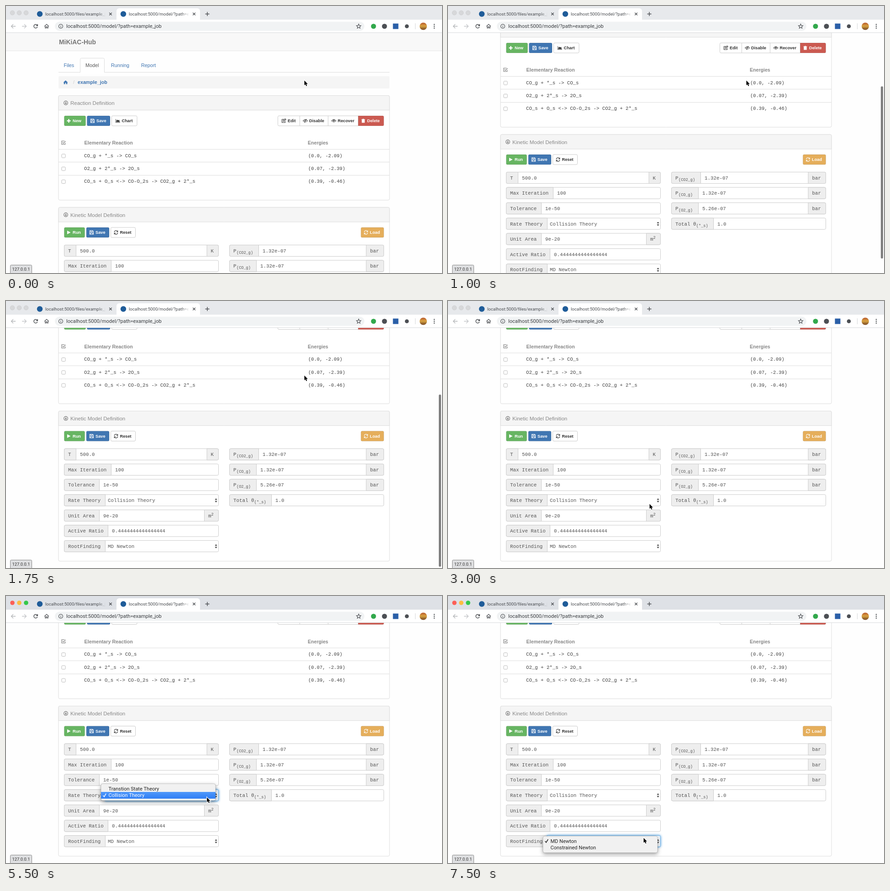
Recreate the animation shown at these times as an HTML page with a canvas. Size 955 by 586 pixels, loop 8000 ms.

```html
<!DOCTYPE html>
<html lang="en">
<head>
<meta charset="utf-8">
<title>Kinetic model form</title>
<style>
html, body { margin: 0; width: 100%; height: 100%; overflow: hidden; background: #fff; }
canvas { display: block; }
</style>
</head>
<body>
<canvas id="stage" width="955" height="586"></canvas>
<script>
const c = document.getElementById('stage').getContext('2d');
const W = 955, H = 586, LOOP = 8000, MAX_SCROLL = 200.5;
const SANS = '"Liberation Sans", Arial, sans-serif';
const MONO = '"Liberation Mono", monospace';
const UI = 'Roboto, sans-serif';
const GREEN = '#67b562', BLUE = '#4076b2', RED = '#cb5a51', ORANGE = '#e5ae5b';

// Step tracks: [start time, values...]
const SCROLL = [[0, 0], [750, 70.3], [1000, 160], [1250, 204.3], [1500, 203.4], [1750, MAX_SCROLL]];
const POINTER = [[0, 653, 163], [2500, 490, 257], [2750, 476, 290], [3000, 441, 445], [3250, 440, 450],
  [3500, 442, 441.5], [5500, 439.5, 441.5], [6500, 426.5, 512], [6750, 428, 529], [7000, 428, 530.5]];
const at = (track, t) => track.filter(k => k[0] <= t).pop().slice(1);

// Icons in a box from -5 to 5: [path, filled]
const ICONS = {
  plus: ['M-4-1.2H-1.2V-4H1.2V-1.2H4V1.2H1.2V4H-1.2V1.2H-4Z', 1],
  save: ['M-4-4H2.3L4-2.3V4H-4ZM-2-4V-1.4H1.6V-4M-2.3 4V1H2.3V4'],
  chart: ['M-5-4H-4.2V3.2H5V4H-5ZM-3.4 2.5V0L-1.4-2.8L.6-.8L2.6-2.4L4.3 2.5Z', 1],
  edit: ['M3 .8V3.7H-4V-3.3H1M-1.3 1V-.8L3-4.6L4.6-3L.5 1Z'],
  eye: ['M-4.8 0Q0-5.6 4.8 0Q0 5.6-4.8 0ZM-1.3-.4A1.3 1.3 0 1 0 1.3-.4A1.3 1.3 0 1 0-1.3-.4'],
  slash: ['M-4.8 0Q0-5.6 4.8 0Q0 5.6-4.8 0ZM2.4-4L-2 4M-.8-1.6V.8'],
  trash: ['M-4-3.4H-1.4L-1-4.4H1L1.4-3.4H4V-2.4H3.2V4.2H-3.2V-2.4H-4Z', 1],
  refresh: ['M-3.8-.8A3.7 3.7 0 0 1 3-2.4M3.8-4.2V-1.2H.9M3.8.8A3.7 3.7 0 0 1-3 2.4M-3.8 4.2V1.2H-.9'],
  play: ['M-3.5-4L4 0L-3.5 4Z', 1],
  down: ['M-4.3 0A4.3 4.3 0 1 0 4.3 0A4.3 4.3 0 1 0-4.3 0M0-2.6V2M-2-.1L0 2L2-.1'],
  house: ['M-5 .3L0-4.3L5 .3H3.8V4H1V1H-1V4H-3.8V.3Z', 1],
  home: ['M-4.6 0L0-4.4L4.6 0M-3.2-1V4H-1V1H1V4H3.2V-1'],
  checked: ['M3.6 .6V3.8H-4V-3.8H2.5M-2.2-.7L-.2 1.5L4.6-3.3'],
  back: ['M5 0H-4.5M0-4.5L-4.5 0L0 4.5'],
  forward: ['M-5 0H4.5M0-4.5L4.5 0L0 4.5'],
  reload: ['M3.8 1.2A4 4 0 1 1 2.9-2.8L4-1.3M4.3-4.6V-1.1H.8'],
  info: ['M-4.5 0A4.5 4.5 0 1 0 4.5 0A4.5 4.5 0 1 0-4.5 0M0-.6V2.5M0-2.5V-1.6'],
  star: ['M0-5L1.4-1.6L5-1.4L2.2 .9L3.1 4.4L0 2.5L-3.1 4.4L-2.2 .9L-5-1.4L-1.4-1.6Z'],
  close: ['M-2.8-2.8L2.8 2.8M2.8-2.8L-2.8 2.8'],
  add: ['M-4.5 0H4.5M0-4.5V4.5'],
  tick: ['M-3.4 .4L-1 3.4L3.2-3.6'],
  arrows: ['M-2.5-1.2L0-4.6L2.5-1.2ZM-2.5 1.2L0 4.6L2.5 1.2Z', 1],
  pointer: ['M0 0V10.6L2.4 8.4L4.1 12.2L5.9 11.4L4.3 7.7H7.5Z', 1]
};

function icon(name, x, y, color, width = 1.1) {
  const [d, filled] = ICONS[name], path = new Path2D(d);
  c.save();
  c.translate(x, y);
  c.fillStyle = c.strokeStyle = color;
  c.lineWidth = width;
  filled ? c.fill(path) : c.stroke(path);
  c.restore();
}

function text(s, x, y, size, color, font = SANS, weight = 400) {
  c.font = `${weight} ${size}px ${font}`;
  c.fillStyle = color;
  c.fillText(s, x, y);
}

const mono = (s, x, y, color = '#555', size = 10.8) => text(s, x, y, size, color, MONO);

function box(x, y, w, h, fill, stroke, radius = 0) {
  c.beginPath();
  c.roundRect(x, y, w, h, radius);
  if (fill) { c.fillStyle = fill; c.fill(); }
  if (stroke) { c.strokeStyle = stroke; c.lineWidth = 1; c.stroke(); }
}

function disc(x, y, r, fill, stroke) {
  box(x - r, y - r, 2 * r, 2 * r, fill, stroke, r);
}

function rule(x1, x2, y, color = '#ddd') {
  c.fillStyle = color;
  c.fillRect(x1, y, x2 - x1, 1);
}

function button(label, name, x, right, y, textX, fill, radius = 2.5) {
  const ink = fill ? '#fff' : '#333';
  box(x + .5, y + .5, right - x - 1, 22, fill || '#fff', fill ? '#0000001a' : '#ccc', radius);
  icon(name, textX - 8.5, y + 11.5, ink);
  text(label, textX, y + 14.7, 9.25, ink, SANS, 700);
}

function panel(title, y, headBottom, bottom) {
  box(115, y, 725, bottom - y, '#fff', '#ddd', 3);
  box(115, y, 725, headBottom - y, '#f5f5f5', '#ddd', [3, 3, 0, 0]);
  icon('down', 131, y + 16.2, '#777');
  text(title, 141, y + 20.5, 11.5, '#888');
}

// One input group: label, optional subscript, value, optional unit.
function field(x, right, row, split, label, value, { sub, unit, unitX, select, focus } = {}) {
  const y = 524.5 + 33.6 * row, base = y + 16.2;
  box(x + .5, y, right - x - 1, 25, '#fff', '#ccc', 3);
  box(x + .5, y, split - x, 25, '#eee', '#ccc', [3, 0, 0, 3]);
  mono(label, x + 9, base);
  if (sub) mono(sub, x + 9 + c.measureText(label).width + .5, base + 3, '#555', 8.6);
  if (focus) {
    c.save();
    c.shadowColor = '#66afe9';
    c.shadowBlur = 5;
    box(split + .5, y, right - split - 1, 25, '#fff', '#66afe9', [0, 3, 3, 0]);
    c.restore();
  }
  mono(value, split + (select ? 6 : 9), base);
  if (select) icon('arrows', right - 6, y + 12.8, '#444');
  if (unit) {
    box(unitX + .5, y, right - unitX - 1, 25, '#eee', '#ccc', [0, 3, 3, 0]);
    mono(unit[0], unitX + 9, base);
    if (unit[1]) mono(unit[1], unitX + 15.5, base - 4, '#555', 8.6);
  }
}

function page(rateFocus, rootFocus) {
  box(0, 59, W, 39, '#f8f8f8');
  rule(0, W, 98, '#e7e7e7');
  text('MiKiAC-Hub', 116, 84, 13.9, '#777', SANS, 700);

  rule(115, 840, 145);
  box(162.5, 114.5, 53, 34, '#fff', '#ddd', [3, 3, 0, 0]);
  box(161, 146, 56, 4, '#fff');
  [['Files', 126.5], ['Model', 174], ['Running', 230], ['Report', 296]].forEach(([s, x]) =>
    text(s, x, 133.8, 10.75, s === 'Model' ? '#555' : BLUE));

  box(115, 154, 725, 27, '#f5f5f5', null, 3);
  icon('house', 130.5, 167.5, BLUE);
  text('/', 147, 171, 10.7, '#ccc');
  text('example_job', 157, 171.2, 10.7, BLUE, SANS, 700);

  panel('Reaction Definition', 196.5, 228.5, 426);
  button('New', 'plus', 127, 175, 240.5, 146, GREEN);
  button('Save', 'save', 177, 228.5, 240.5, 198, BLUE);
  button('Chart', 'chart', 231, 287.5, 240.5, 253.5);
  button('Edit', 'edit', 595, 644, 240.5, 617, null, [2.5, 0, 0, 2.5]);
  button('Disable', 'slash', 643, 706, 240.5, 664, null, 0);
  button('Recover', 'eye', 705, 772, 240.5, 726.5, null, 0);
  button('Delete', 'trash', 771, 828, 240.5, 791, RED, [0, 2.5, 2.5, 0]);

  icon('checked', 126, 300, '#777');
  text('Elementary Reaction', 171.5, 304, 10.75, '#888', SANS, 700);
  text('Energies', 661, 304, 10.6, '#888', SANS, 700);
  [['CO_g + *_s -> CO_s', '(0.0, -2.09)'],
   ['O2_g + 2*_s -> 2O_s', '(0.07, -2.39)'],
   ['CO_s + O_s <-> CO-O_2s -> CO2_g + 2*_s', '(0.39, -0.46)']].forEach(([reaction, energy], i) => {
    const y = 314 + i * 28.3;
    rule(115, 840, Math.round(y));
    box(122, y + 11, 8, 8, '#fff', '#bbb', 1.5);
    mono(reaction, 171, y + 17.7, '#444', 10.7);
    mono(energy, 662, y + 17.7, '#444', 10.4);
  });

  panel('Kinetic Model Definition', 442, 474, 771.5);
  button('Run', 'play', 127, 173, 485.5, 146, GREEN);
  button('Save', 'save', 175.5, 226.5, 485.5, 196, BLUE);
  button('Reset', 'refresh', 229, 284, 485.5, 249.5);
  button('Load', 'refresh', 777, 828, 485.5, 797, ORANGE);

  const left = (...a) => field(127, 466, ...a), right = (...a) => field(489, 828, ...a);
  const bar = { unit: ['bar'], unitX: 788.5 };
  left(0, 153, 'T', '500.0', { unit: ['K'], unitX: 439.5 });
  left(1, 230, 'Max Iteration', '100');
  left(2, 204, 'Tolerance', '1e-50');
  left(3, 217, 'Rate Theory', 'Collision Theory', { select: true, focus: rateFocus });
  left(4, 204, 'Unit Area', '9e-20', { unit: ['m', '2'], unitX: 434 });
  left(5, 223, 'Active Ratio', '0.4444444444444444');
  left(6, 217, 'RootFinding', 'MD Newton', { select: true, focus: rootFocus });
  right(0, 553, 'P', '1.32e-07', { sub: '(CO2_g)', ...bar });
  right(1, 548, 'P', '1.32e-07', { sub: '(CO_g)', ...bar });
  right(2, 548, 'P', '5.26e-07', { sub: '(O2_g)', ...bar });
  right(3, 581, 'Total θ', '1.0', { sub: '(*_s)' });
}

function tabTitle(title, x, right, bg) {
  c.save();
  c.beginPath();
  c.rect(x, 5, right - x, 24);
  c.clip();
  text(title, x, 20.5, 9.65, '#4a4d51', UI);
  const fade = c.createLinearGradient(right - 16, 0, right, 0);
  fade.addColorStop(0, bg + '00');
  fade.addColorStop(1, bg);
  box(right - 16, 5, 16, 24, fade);
  c.restore();
}

function browser(active) {
  const strip = active ? '#dee1e6' : '#e7e9ec';
  box(0, 0, W, 30, strip);
  ['#fc5f57', '#fdbc40', '#34c84a'].forEach((color, i) =>
    disc(14 + 15 * i, 15, 4.8, active ? color : '#d7d8da', active ? null : '#cfd0d2'));
  box(242, 5, 183, 26, '#fff', null, [6, 6, 0, 0]);
  [[74, 229, 'localhost:5000/files/example_job', strip],
   [257, 412, 'localhost:5000/model/?path=example_job', '#ffffff']].forEach(([x, closeX, title, bg]) => {
    disc(x, 17.5, 6.2, '#1f5c99');
    tabTitle(title, x + 12, closeX - 11, bg);
    icon('close', closeX, 17.5, '#4a4d51', 1.3);
  });
  icon('add', 441, 17.5, '#4a4d51', 1.4);

  box(0, 30, W, 28, '#fff');
  rule(0, W, 58, '#d8dadc');
  icon('back', 16, 44.5, '#b4b6b9', 1.3);
  icon('forward', 40, 44.5, '#c4c6c9', 1.3);
  icon('reload', 65, 44.5, '#4a4d51', 1.4);
  icon('home', 89, 44.5, '#4a4d51', 1.2);
  box(107, 34.5, 678, 20, '#f1f3f4', null, 10);
  icon('info', 120, 44.5, '#4a4d51');
  text('localhost:5000/model/?path=example_job', 132, 48.3, 11.12, '#3a3d41', UI);
  icon('star', 772.5, 44.5, '#4a4d51');
  disc(805, 44.5, 5.5, '#32a84c');
  disc(829, 44.5, 5.5, '#4c4f54');
  box(847.5, 38.5, 12, 12, '#2b5fa8');
  disc(878, 44.5, 4.3, '#4c4f54');
  box(896, 38, 1, 13, '#d5d7da');
  const photo = c.createLinearGradient(0, 36, 0, 52);
  photo.addColorStop(0, '#b5532c');
  photo.addColorStop(.5, '#d9a441');
  photo.addColorStop(1, '#7a4a24');
  disc(914, 44.5, 8, photo);
  [-4, 0, 4].forEach(dy => disc(938, 44.5 + dy, 1.2, '#4a4d51'));
}

function menu(y, items, checked, highlight, alpha = 1) {
  const bottom = y + (highlight >= 0 ? 37 : 36.5);
  c.save();
  c.globalAlpha = alpha;
  c.shadowColor = '#00000066';
  c.shadowBlur = 9;
  c.shadowOffsetY = 3;
  box(208, y, 251, bottom - y, '#f1f1f1', null, 4);
  c.shadowColor = 'transparent';
  box(208, y, 251, bottom - y, null, '#0000002a', 4);
  items.forEach((item, i) => {
    const mid = y + 10.6 + 14.6 * i, ink = i === highlight ? '#fff' : '#222';
    if (i === highlight) {
      const blue = c.createLinearGradient(0, mid - 7, 0, mid + 7.5);
      blue.addColorStop(0, '#4f98fa');
      blue.addColorStop(1, '#2f7ef5');
      box(208, mid - 7.3, 251, 14.8, blue);
    }
    if (i === checked) icon('tick', 216, mid, ink, 1.5);
    text(item, 224.5, mid + 3.9, 11, ink, UI);
  });
  c.restore();
}

function draw(t) {
  const [scroll] = at(SCROLL, t), [px, py] = at(POINTER, t);
  const rateFocus = t >= 4500 && t < 7250, rootFocus = t >= 7250;

  c.fillStyle = '#fefefe';
  c.fillRect(0, 0, W, H);
  c.save();
  c.translate(0, -scroll);
  page(rateFocus, rootFocus);
  c.restore();

  if (t >= 750 && t < 2000) box(948, 61 + Math.min(scroll, MAX_SCROLL) * .72, 5, 378, '#7f7f7f', null, 2.5);
  browser(t >= 3750);

  const bounce = Math.max(0, scroll - MAX_SCROLL);
  box(9.5, 568.5 - bounce, 47, 18, '#dedfe1', '#8a8a8a', [2, 2, 0, 0]);
  text('127.0.0.1', 13.5, 581 - bounce, 9.35, '#333', UI);

  if (t >= 4500 && t < 6250)
    menu(412, ['Transtion State Theory', 'Collision Theory'], 1, 1, t < 6000 ? 1 : .4);
  if (rootFocus) menu(527, ['MD Newton', 'Constrained Newton'], 0, -1);

  c.save();
  c.translate(px + .5, py + .5);
  c.strokeStyle = '#fff';
  c.lineWidth = 2;
  c.stroke(new Path2D(ICONS.pointer[0]));
  c.restore();
  icon('pointer', px + .5, py + .5, '#000');
}

function tick() {
  draw(performance.now() % LOOP);
  requestAnimationFrame(tick);
}
tick();
</script>
</body>
</html>
```
